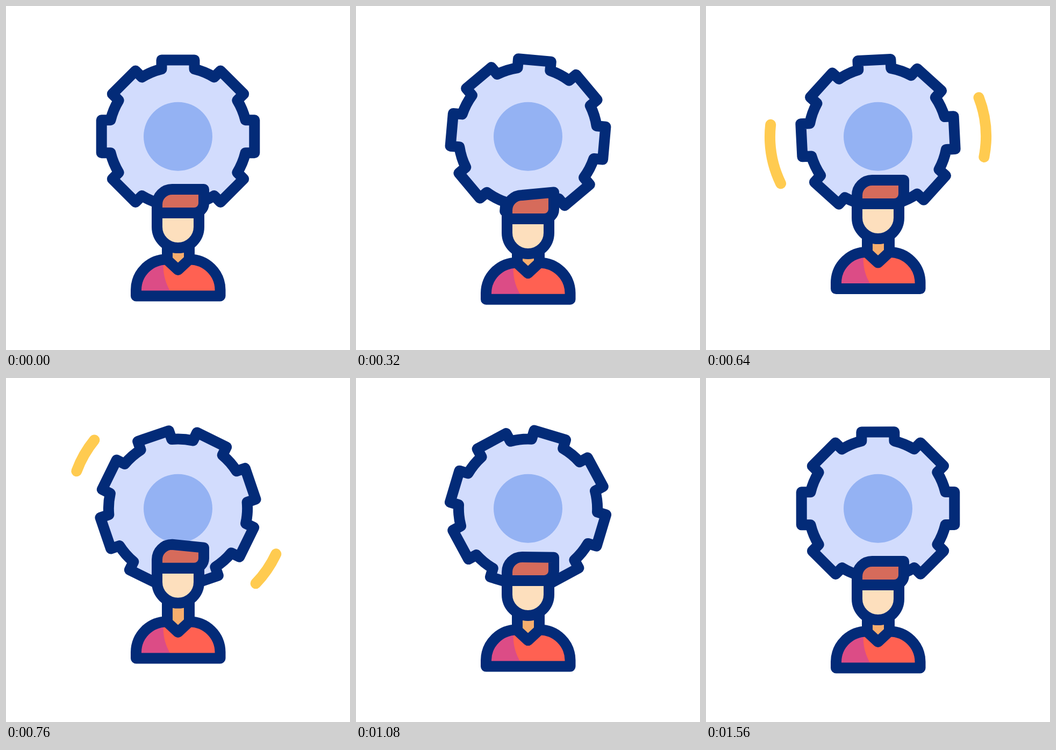
An HTML page that plays this animation: 640 by 640 pixels, repeating every 1680 ms.

```html
<!DOCTYPE html>
<html lang="en">
<head>
<meta charset="utf-8">
<title>Gear and person</title>
<style>
  html, body { margin: 0; width: 100%; height: 100%; overflow: hidden; background: #fff; }
  svg { display: block; width: 100%; height: 100%; }
  .line { stroke: #032b78; stroke-width: 20; stroke-linejoin: round; stroke-linecap: round; }
  .spark { fill: none; stroke: #ffcb50; stroke-width: 20; stroke-linecap: round; }
</style>
</head>
<body>
<svg viewBox="0 0 640 640">
  <path class="spark"/>
  <path class="spark"/>
  <path id="gear" class="line" fill="#d2dcfd"/>
  <circle cx="320" cy="242.7" r="64" fill="#94b2f3"/>
  <path id="neck" fill="#f8ae6e"/>
  <path id="neckSides" class="line" fill="none"/>
  <g id="body">
    <path fill="#dc4c86" d="M242 539.5V528A57 57 0 0 1 299 471.5L320 491L341 471.5A57 57 0 0 1 398.500 528V539.500Z"/>
    <path fill="#ff6152" d="M293 474C291 497 297 517 306 531V539H398V528A57 57 0 0 0 341 471.500L320 491L299 471.500Z"/>
    <path class="line" fill="none" d="M242 539.500V528A57 57 0 0 1 299 471.500L320 491L341 471.500A57 57 0 0 1 398.500 528V539.500Z"/>
  </g>
  <g id="head">
    <path class="line" fill="#fddfbd" d="M281 385V411A39 39 0 0 0 359 411V385Z"/>
    <path id="hair" class="line" fill="#d66b5b"/>
  </g>
</svg>
<script>
const LOOP = 1680, STEP = 40;
const CX = 320, CY = 242.7;
const $ = id => document.getElementById(id);
const gear = $('gear'), neck = $('neck'), neckSides = $('neckSides');
const body = $('body'), head = $('head'), hair = $('hair');
const sparks = document.querySelectorAll('.spark');

// [time in ms, offset in px]
const BODY = [[20, 0], [420, 7.3], [725, -18.3], [1200, 0]];
const HEAD = [[40, 0], [440, 14], [760, -31.2], [1240, 0]];
const TIP = [[60, 0], [460, -7.6], [810, 6.6], [1220, -1.2], [1520, 0]];

const clamp = x => Math.min(1, Math.max(0, x));
const smooth = x => x * x * (3 - 2 * x);
const cubic = x => x < 0.5 ? 4 * x ** 3 : 1 - 4 * (1 - x) ** 3;
const progress = (t, start, length) => cubic(clamp((t - start) / length));

function track(keys, t) {
  let value = keys[0][1];
  for (let i = 1; i < keys.length; i++) {
    const [t0, v0] = keys[i - 1], [t1, v1] = keys[i];
    if (t >= t0) value = v0 + (v1 - v0) * smooth(clamp((t - t0) / (t1 - t0)));
  }
  return value;
}

function polar(radius, deg) {
  const a = deg * Math.PI / 180;
  return `${(CX + radius * Math.cos(a)).toFixed(2)} ${(CY + radius * Math.sin(a)).toFixed(2)}`;
}

function gearPath() {
  const half = 30.5, root = 125.5, top = 142.3;
  const points = [[root, -half], [top, -half], [top, half], [root, half]];
  const valley = Math.hypot(root, half);
  let d = '';
  for (let tooth = 0; tooth < 8; tooth++) {
    points.forEach(([x, y], i) => {
      const at = polar(Math.hypot(x, y), tooth * 45 + Math.atan2(y, x) * 180 / Math.PI);
      if (i) d += 'L' + at;
      else d += tooth ? `A${valley} ${valley} 0 0 1 ${at}` : 'M' + at;
    });
  }
  return d + `A${valley} ${valley} 0 0 1 ${polar(valley, Math.atan2(-half, root) * 180 / Math.PI)}Z`;
}

function drawSparks(t) {
  const lead = progress(t, 293, 655), trail = progress(t, 368, 667);
  const shown = lead - trail > 0.002;
  sparks.forEach((el, i) => {
    const from = -49 + i * 175.3, span = 102.7;
    el.setAttribute('d', shown
      ? `M${polar(201, from + span * trail)}A201 201 0 0 1 ${polar(201, from + span * lead)}`
      : '');
  });
}

function draw(t) {
  const b = track(BODY, t), h = track(HEAD, t), tip = track(TIP, t);
  gear.setAttribute('transform', `rotate(${180 * progress(t, 11, 1620)} ${CX} ${CY})`);
  drawSparks(t);
  body.setAttribute('transform', `translate(0 ${b})`);
  head.setAttribute('transform', `translate(0 ${h})`);
  neck.setAttribute('d', `M300 ${440 + h}H341V${471.5 + b}L320 ${491 + b}L300 ${471.5 + b}Z`);
  neckSides.setAttribute('d', `M300 ${440 + h}V${471.5 + b}M341 ${440 + h}V${471.5 + b}`);
  hair.setAttribute('d',
    `M281 385V369A28 28 0 0 1 309 341L368 ${341 + tip}V367A18 18 0 0 1 350 385Z`);
}

gear.setAttribute('d', gearPath());
const start = performance.now();
function tick() {
  const t = (performance.now() - start) % LOOP;
  draw(Math.floor(t / STEP) * STEP);
  requestAnimationFrame(tick);
}
tick();
</script>
</body>
</html>
```
